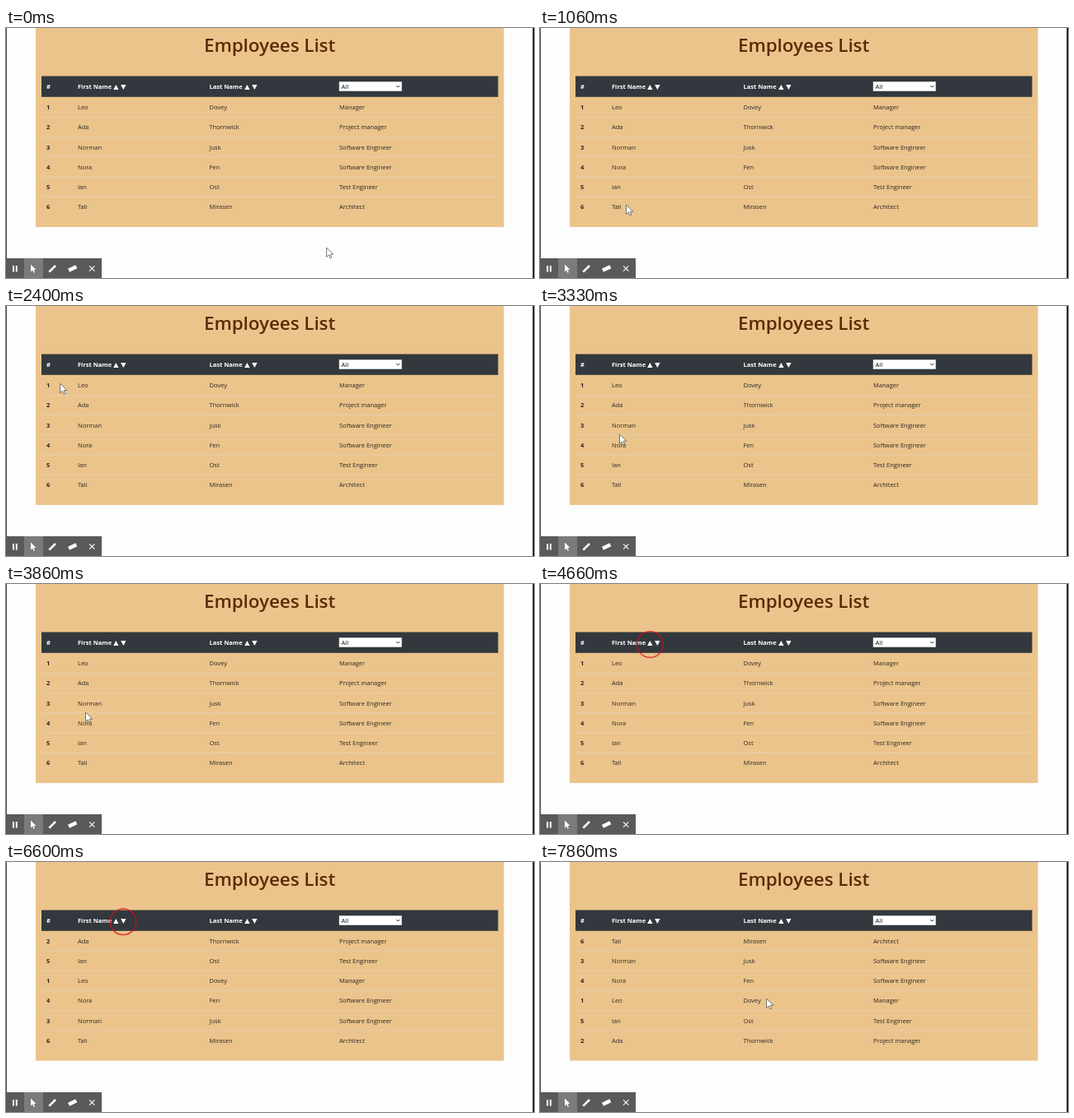
These frames come from a looping animation (640x304 px, 8000 ms). An HTML page with a canvas:

```html
<!DOCTYPE html>
<html lang="en">
<head>
<meta charset="utf-8">
<title>Employees List</title>
<style>
html, body { margin: 0; width: 100%; height: 100%; overflow: hidden; background: #fdfdfd; }
canvas { display: block; width: 640px; height: 304px; }
</style>
</head>
<body>
<canvas id="stage" width="640" height="304"></canvas>
<script>
const ctx = document.getElementById('stage').getContext('2d');
const LOOP = 8000, FONT = '"Open Sans", "Noto Sans", sans-serif';
const TAN = '#ebc48c', DARK = '#32383d', INK = '#2b2721';
const LEFT = 43, WIDTH = 553.5, PITCH = 24.2;
const columns = [49, 87, 246.5, 404];

const people = [
  ['Leo', 'Dovey', 'Manager'],
  ['Ada', 'Thornwick', 'Project manager'],
  ['Norman', 'Jusk', 'Software Engineer'],
  ['Nora', 'Fen', 'Software Engineer'],
  ['Ian', 'Ost', 'Test Engineer'],
  ['Tali', 'Mirasen', 'Architect']
].map((cells, i) => [i + 1, ...cells]);
const ascending = [...people].sort((a, b) => a[1] < b[1] ? -1 : 1);
const descending = [...ascending].reverse();

const SORT_UP = 4860, SORT_DOWN = 6800, PRESS = 265;
const moves = [
  { from: 60, to: 460, x: 345, y: 240 },
  { from: 800, to: 1060, x: 104.5, y: 215 },
  { from: 1600, to: 2400, x: 65.7, y: 94.3 },
  { from: 3000, to: 3330, x: 96.5, y: 156 },
  { from: 3860, to: 4200, x: 133.5, y: 73.5 },
  { from: SORT_UP, to: 5660, x: 106, y: 170 },
  { from: 5730, to: 6260, x: 142, y: 72.7 },
  { from: 7660, to: 7860, x: 274.5, y: 166 }
];

function rect(x, y, w, h, color) {
  ctx.fillStyle = color;
  ctx.fillRect(x, y, w, h);
}

function text(str, x, y, color = INK, weight = 400, size = 7.5) {
  ctx.font = `${weight} ${size}px ${FONT}`;
  ctx.fillStyle = color;
  ctx.fillText(str, x, y);
}

function line(x1, y1, x2, y2, color, width) {
  ctx.beginPath();
  ctx.moveTo(x1, y1);
  ctx.lineTo(x2, y2);
  ctx.strokeStyle = color;
  ctx.lineWidth = width;
  ctx.stroke();
}

// Triangle centred on x, y; dir 1 points up, -1 down
function triangle(x, y, dir) {
  ctx.beginPath();
  ctx.moveTo(x - 3.2, y + 3 * dir);
  ctx.lineTo(x, y - 3 * dir);
  ctx.lineTo(x + 3.2, y + 3 * dir);
  ctx.fillStyle = '#fff';
  ctx.fill();
}

const arrowPath = new Path2D('M0 0V11.5L2.7 9 4.5 13 6.3 12.2 4.6 8.3 8.2 8.2Z');
function arrow(x, y, scale, edge) {
  ctx.save();
  ctx.translate(x, y);
  ctx.scale(scale, scale);
  ctx.fillStyle = '#fff';
  ctx.fill(arrowPath);
  if (edge) {
    ctx.strokeStyle = edge;
    ctx.lineWidth = 0.8;
    ctx.stroke(arrowPath);
  }
  ctx.restore();
}

function header() {
  ctx.textAlign = 'center';
  text('Employees List', 319.6, 28.6, '#5c2a04', 600, 22.3);
  ctx.textAlign = 'left';
  rect(LEFT, 58.5, WIDTH, 25.3, DARK);
  ['#', 'First Name', 'Last Name'].forEach((label, c) => {
    text(label, columns[c], 74.4, '#fff', 700);
    if (!c) return;
    const x = columns[c] + 46 - c / 2;
    triangle(x + 0.8, 72, 1);
    triangle(x + 9.8, 72, -1);
  });
  rect(403.5, 65, 76.5, 12, '#8a8d90');
  rect(404, 65.5, 75.5, 11, '#fff');
  text('All', 406.5, 74.2, '#111');
  for (const side of [-2, 2]) line(475.3 + side, 70, 475.3, 72, '#222', 1);
}

function table(rows, shift) {
  rect(36, 0, 567.5, 242 + shift, TAN);
  header();
  rows.forEach((row, i) => {
    const y = 99.2 + i * PITCH + shift;
    if (i) rect(LEFT, y - 15.4, WIDTH, 0.6, '#e2d6c0');
    row.forEach((cell, c) => text(cell, columns[c], y, INK, c ? 400 : 700));
  });
}

function toolbar() {
  rect(0, 280, 116, 24, '#5a5a5a');
  rect(22, 280, 23, 24, '#7b7b7b');
  for (const x of [8, 11.8]) rect(x, 289, 2, 7.5, '#fff');
  arrow(30, 287.5, 0.78);
  line(52.3, 296.7, 60, 289, '#fff', 2.6);
  line(76, 294.8, 85.3, 290.2, '#fff', 4.6);
  for (const d of [-3.2, 3.2]) line(104.2 - d, 289.3, 104.2 + d, 295.7, '#fff', 1.1);
}

function pointerAt(t) {
  let x = 388.5, y = 267;
  for (const m of moves) {
    const k = Math.min(1, Math.max(0, (t - m.from) / (m.to - m.from)));
    const ease = k * k * (3 - 2 * k);
    x += (m.x - x) * ease;
    y += (m.y - y) * ease;
  }
  return [x, y];
}

function pointer(t) {
  const [x, y] = pointerAt(t);
  const pressed = [SORT_UP, SORT_DOWN].some(end => t >= end - PRESS && t < end);
  if (!pressed) return arrow(x, y, 1, '#555');
  ctx.beginPath();
  ctx.arc(x, y, 15.8, 0, 2 * Math.PI);
  ctx.strokeStyle = 'rgba(218, 8, 24, 0.75)';
  ctx.lineWidth = 1.5;
  ctx.stroke();
}

function draw(t) {
  rect(0, 0, 640, 304, '#fdfdfd');
  const rows = t < SORT_UP ? people : t < SORT_DOWN ? ascending : descending;
  table(rows, t < SORT_UP ? 0 : -0.4);
  rect(0, 0, 0.8, 304, '#222');
  rect(638.5, 0, 1.5, 304, '#000');
  toolbar();
  pointer(t);
}

const start = performance.now();
function tick() {
  draw((performance.now() - start) % LOOP);
  requestAnimationFrame(tick);
}
tick();
</script>
</body>
</html>
```
